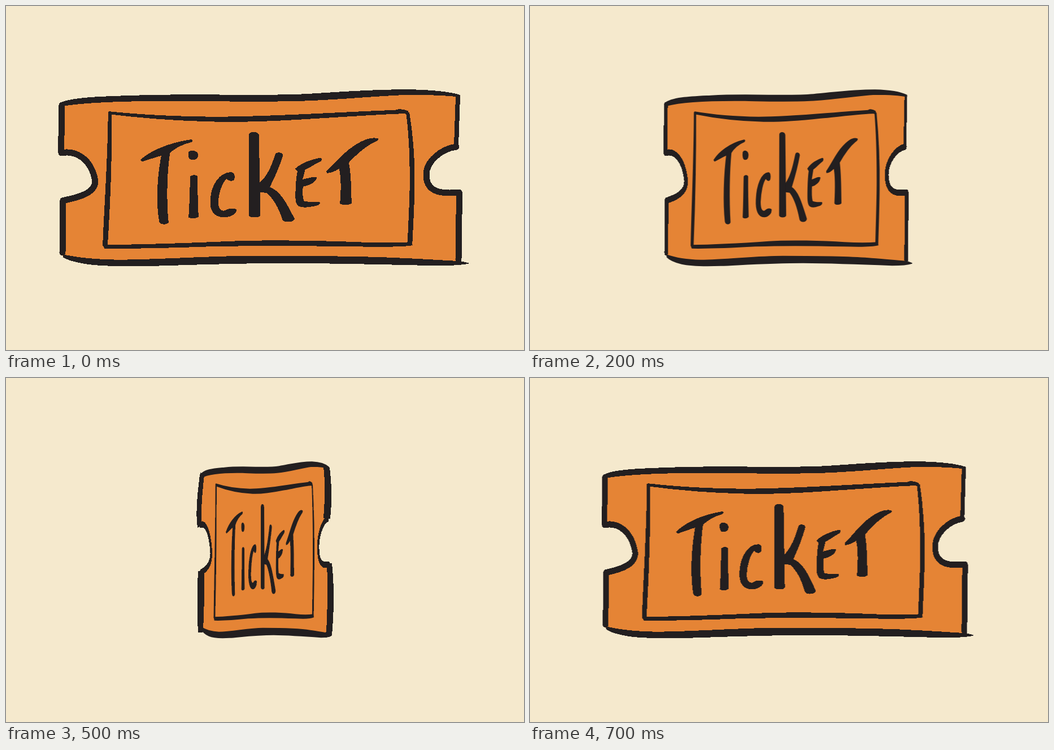
An HTML page for the animation above (800 ms loop, 917x611 px).

```html
<!DOCTYPE html>
<html lang="en">
<head>
<meta charset="utf-8">
<title>Spinning ticket</title>
<style>
  html, body { margin: 0; width: 100%; height: 100%; overflow: hidden; background: #f5e9cd; }
  svg { display: block; width: 100vw; height: 100vh; shape-rendering: crispEdges; }
  .paper { fill: #e58435; }
  .ink { fill: #231f20; stroke: #231f20; stroke-width: 1.6; stroke-linejoin: round; }
  .line { fill: none; stroke: #231f20; stroke-width: 11; stroke-linecap: round; stroke-linejoin: round; }
  #sides, #edge { visibility: hidden; stroke: none; }
</style>
</head>
<body>
<svg viewBox="0 0 917 611" role="img" aria-label="Ticket">
  <g id="ticket">
    <path class="paper" d="M99 173 C150 162 230 163 330 163 C410 163 460 164 520 163 C600 159 640 153 710 152 C750 152 780 156 800 160 L797 250 C770 254 744 276 744 300 C744 328 766 335 802 331 L801 456 C700 453 600 450 480 450 C360 450 300 456 210 457 C160 456 130 452 100 444 L101 346 C135 339 158 330 158 311 C150 270 122 256 97.500 261 Z"/>

    <!-- outer border -->
    <g class="ink">
      <path d="M96 173 C115 162 180 161 230 159.500 C290 157.500 350 158 400 158.500 C460 158.500 490 159 530 157 C600 153 640 149 710 149 C750 149.500 785 153 803 158.500 L803 161 C780 158 740 157 710 157 C640 160 590 166 520 168 C450 170 380 168.500 330 168 C250 167.500 150 169 101 177 Z"/>
      <path d="M101 442 C130 448.500 160 451 200 451.500 C280 451 360 444.500 440 444.500 C550 444.500 640 445 700 448.500 C740 450 780 453 805 454 L818 457 C800 460.500 780 460.500 760 460.500 C700 459 600 456.500 500 456 C400 456 320 459.500 260 461 C210 462 170 461.500 145 458 C125 455 110 451 102 446 Z"/>
    </g>
    <g class="line">
      <path d="M99 176 L97.500 259 M101 346 L100 438"/>
      <path d="M98 261 C122 256 151 270 158 311 C158 330 135 339 101 345.500"/>
      <path style="stroke-width:8" d="M800 161 L797 248"/>
      <path d="M797 250 C770 254 744 276 744 300 C744 328 766 335 802 331"/>
      <path d="M802.500 332 L801 450"/>
    </g>

    <!-- inner frame -->
    <g class="ink">
      <path d="M181.500 189 L186.500 190 C187 260 185.500 330 179 426 L172 425 C174 360 181 280 181.500 189 Z"/>
      <path d="M183 188 C230 193 300 197 370 197.500 C470 197.500 570 190 690 185.500 C693 183 704 184 711 187 L713 192 L706 190.500 C690 190 610 195.500 550 199 C490 203 430 205.500 385 205 C310 204 240 198.500 183 191.500 Z"/>
      <path d="M709 190 L713.500 190 C720 230 723.500 280 722.500 325 C722 360 720 390 718.500 423 L711.500 424 C713 380 716 340 715.500 305 C715.500 260 713 220 709 190 Z"/>
      <path d="M172 425 C250 424.500 330 421.500 400 418.500 C460 416 560 417.500 620 420 C660 421.500 690 421.500 717 420 L719 424.500 C700 427.500 670 427.500 620 426.500 C550 425.500 430 425 360 426.500 C290 429 230 430.500 175 430 Z"/>
    </g>

    <!-- lettering -->
    <g class="ink">
      <path d="M239 273.500 C253 260 285 244 327 238 C330 238 331 239 328 241 C308 246 297 253 288 262 C274 264 257 271 241 275.500 Z"/>
      <path d="M277 260 L290 258 C284 295 283 345 287 384 C284 388 274 388 272 383 C266 350 268 300 277 260 Z"/>
      <path d="M324 260 C327 256 338 257 339.500 264 C339.500 271 335 273 329 272.500 C324 272 323 266 324 260 Z"/>
      <path d="M327 303 C330 300.500 336 300 338.500 303 C338 325 339 350 340 374 C336 377 327 377 324 375 C326 350 326 325 327 303 Z"/>
      <path d="M398 296 C404 296 405 302 403.500 307 C402 311 395 311 391 306 C382 312 376 332 375 348 C375 361 380 366 388 364 C393 361 400 359 407 361.500 C408 368 398 374.500 386 374.500 C368 374.500 361 362 362.500 344 C364 318 378 297 398 296 Z"/>
      <path d="M431 228 C433 223.500 445 223.500 447 229 L449.500 372 C447 375.500 433 375.500 430.500 372 Z"/>
      <path d="M477.500 264 C479 260 488 260 489.500 265 C484 284 475 304 466 322 C487 330 497 353 510 378 C509 383 494 385 490 379 C484 360 475 342 461 331 L449 330 L449 315 C464 302 471 283 477.500 264 Z"/>
      <path d="M513 289 C523 280 541 273 556 270.500 C559 270.500 559 273 557 275 C546 280 539 286 529 290 L524 309 C535 307 544 303 549.500 305 C548 312 538 318 525 320 C524 330 524 340 527 347 C537 350 547 349 554.500 349 C556 351 553 354 544 355 C535 357 525 358 519 355 C512 351 513 340 513.500 323 C514 312 515 301 517 293 Z"/>
      <path d="M568 293.500 C585 279 595 263 615 250 C631 239 646 233 658 236 C660 237 657 239 652 241 C636 249 618 265 606 278 C611 301 610 326 611 350 C608 353 594 353 592 350 C594 326 595 304 590 288 C582 293 575 296 568.500 296 Z"/>
    </g>
  </g>

  <!-- thicker sides when nearly edge-on -->
  <g id="sides" class="ink">
    <path d="M344 168 L351 172 C348 200 345 230 346 262 L339 266 C335 240 339 200 344 168 Z"/>
    <path d="M340 343 L351 341 C350 375 352 420 348 452 L340 452 C338 420 338 380 340 343 Z"/>
    <path d="M562 157 L573 159 C577 190 577 220 574 250 L562 249 C564 220 566 190 562 157 Z"/>
    <path d="M568 329 L577 329 C582 380 580 420 577 457 C573 462 562 461 550 459 L567 451 C569 410 570 370 568 329 Z"/>
  </g>

  <path id="edge" class="ink" d="M452 153 C455 149 463 149 466 153 C467 220 465 290 466 350 C467 395 466 435 465 467 C462 471.500 454 471.500 452 467 C450 420 452 370 451 310 C450 255 452 205 452 153 Z"/>
</svg>
<script>
  // [width factor, x offset] per step; 0 is edge-on
  const wide = [1, 0], turn = [0.906, 43.2], half = [0.606, 180.6], slim = [0.323, 312.3], thin = [0, 458.5];
  const steps = [wide, turn, half, slim, thin, slim, half, turn];

  const play = (id, style) => {
    const frames = steps.map((s, i) => ({ ...style(s), offset: i / steps.length, easing: "step-end" }));
    frames.push({ ...style(steps[steps.length - 1]), offset: 1 });
    document.getElementById(id).animate(frames, { duration: 800, iterations: Infinity });
  };
  const show = on => ({ visibility: on ? "visible" : "hidden" });

  play("ticket", s => ({ transform: `matrix(${s[0]}, 0, 0, 1, ${s[1]}, 0)`, ...show(s !== thin) }));
  play("sides", s => show(s === slim));
  play("edge", s => show(s === thin));
</script>
</body>
</html>
```
